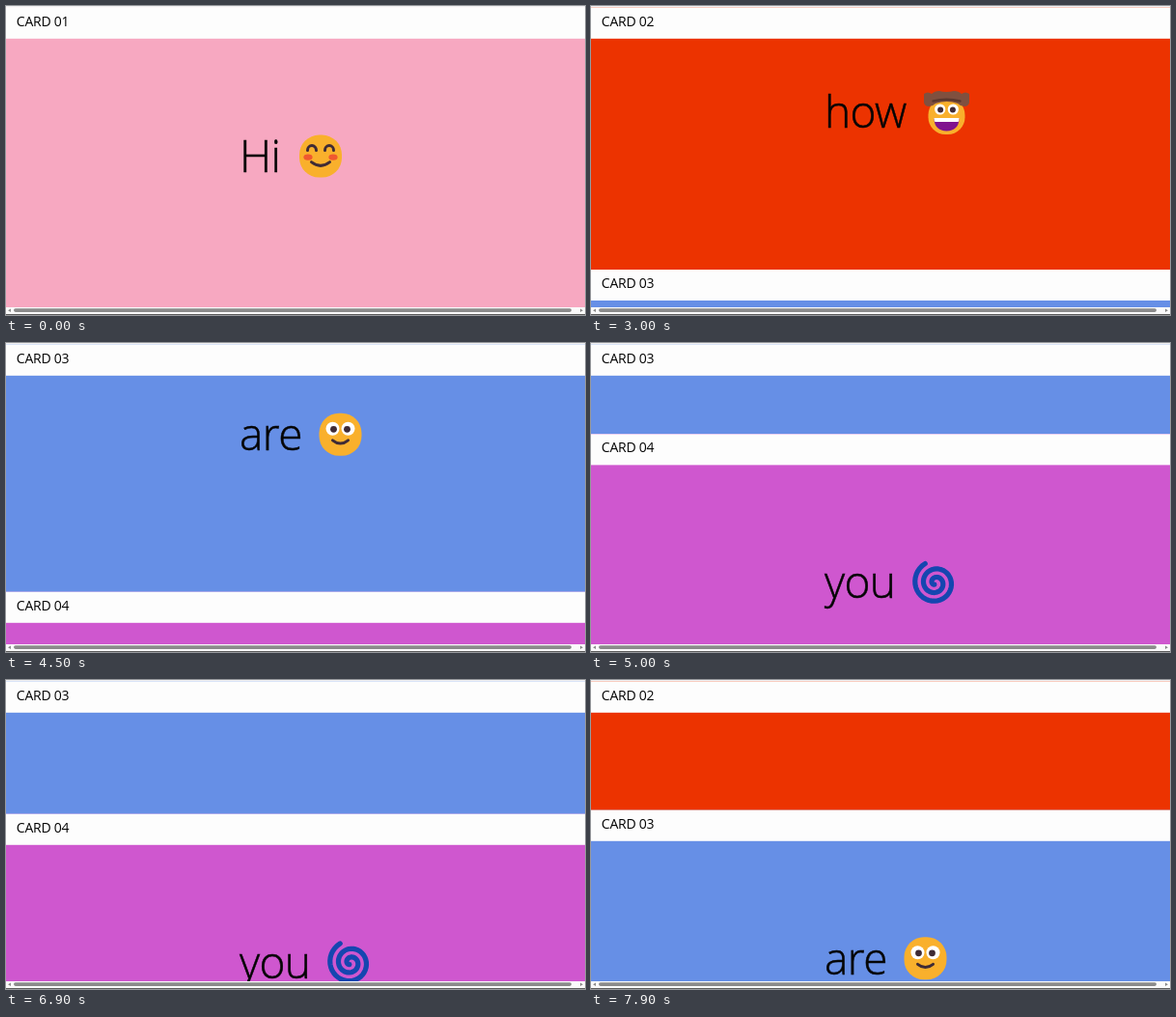
An HTML page for the animation above (8000 ms loop, 600 px wide and 320 px high).

```html
<!DOCTYPE html>
<html lang="en">
<head>
<meta charset="utf-8">
<title>Sticky cards</title>
<style>
  html, body { margin: 0; width: 100%; height: 100%; overflow: hidden; background: #fdfdfd; }
  svg { display: block; width: 600px; height: 320px; }
  text { font-family: "Open Sans", "Noto Sans", sans-serif; fill: #050505; }
  .title { font-size: 14px; font-weight: 500; letter-spacing: -.25px; }
  .word { font-size: 46px; font-weight: 300; letter-spacing: -.6px; stroke: #050505; stroke-width: .5px; }
  .line { fill: none; stroke-linecap: round; stroke-linejoin: round; }
</style>
</head>
<body>
<svg viewBox="0 0 600 320">
  <defs><clipPath id="view"><rect y="1.8" width="600" height="310.2"/></clipPath></defs>
  <rect width="600" height="320" fill="#fdfdfd"/>
  <g id="cards" clip-path="url(#view)"></g>
  <rect width="600" height="1" fill="#f0f0f1"/>
  <g id="scrollbar">
    <rect y="312" width="600" height="8" fill="#fafafa"/>
    <rect x="8" y="313.3" width="578" height="3.6" rx="1.8" fill="#8b8b8b"/>
    <path d="M5 313.4v3.6l-3-1.8zM595 313.4v3.6l3-1.8z" fill="#8b8b8b"/>
    <rect y="319" width="600" height="1" fill="#5c5c5c"/>
  </g>
</svg>
<script>
const LOOP = 8000, STEP = 100;
const CARD_H = 316.5, HEAD_H = 32, TOP = 1.8;

// [time, scroll offset]
const SCROLL = [
  [0, 0], [2100, 0], [2200, 20], [3000, 361.8], [4500, 693.5],
  [5300, 955], [6500, 955], [6900, 812.5], [7900, 500]
];

const INK = '#3f2b35', GOLD = '#f9b02c';
const face = r => `<rect x="${-r}" y="${-r}" width="${2 * r}" height="${2 * r}" rx="${r * 0.93}" fill="${GOLD}"/>`;
const dot = (x, y, r, fill) => `<circle cx="${x}" cy="${y}" r="${r}" fill="${fill}"/>`;
const line = (d, color, width) => `<path class="line" d="${d}" stroke="${color}" stroke-width="${width}"/>`;
const pair = draw => draw(-1) + draw(1);

function blush() {
  return face(22) +
    pair(s => `<ellipse cx="${s * 13}" cy="1" rx="4.6" ry="3.2" fill="#f0592f"/>`) +
    pair(s => line(`M${s * 9 - 4.5} -6.2a4.5 4.8 0 0 1 9 0`, INK, 3)) +
    line('M-9.5 6Q0 13.5 9.5 6', INK, 3);
}

function cowboy() {
  return face(19) +
    pair(s => dot(s * 6.8, -7, 5.6, '#fff') + dot(s * 6.4, -6.5, 3, INK)) +
    '<path d="M-13 2.5h26c0 8-5 13-13 13s-13-5-13-13z" fill="#80138f"/>' +
    '<path d="M-13 2h26q0 3-1 4h-24q-1-1-1-4z" fill="#fff"/>' +
    '<path d="M-23.5 -23q4-3 8 0q3-3 8-3q7 2 15 0q5 0 8 3q4-3 8 0v9q-1 4-5 4q-4 0-7-3q-11-4-23 0q-3 3-7 3q-4 0-5-4z" fill="#80503f"/>' +
    line('M-14 -15.5Q0 -19 14 -15.5', '#5b382e', 2.4);
}

function smile() {
  return face(22) +
    pair(s => dot(s * 8, -6, 7, '#fff') + dot(s * 7, -5.5, 3.4, INK)) +
    line('M-8 6Q0 12.5 8 6', INK, 3);
}

function spiral() {
  const n = 90, turns = 2.35;
  let d = '';
  for (let i = 0; i <= n; i++) {
    const k = i / n, r = 22.5 - 20.5 * k, a = -2.06 - k * turns * 2 * Math.PI;
    d += `${i ? 'L' : 'M'}${(1.5 + r * Math.cos(a)).toFixed(2)} ${(r * Math.sin(a)).toFixed(2)}`;
  }
  return line(d, '#1546b0', 5.2);
}

const CARDS = [
  { word: 'Hi', color: '#f7a8c1', x: 326, y: 153.8, art: blush },
  { word: 'how', color: '#ec3300', x: 368.5, y: 157.5, art: cowboy },
  { word: 'are', color: '#668fe6', x: 346.5, y: 153.5, art: smile },
  { word: 'you', color: '#cf57cf', x: 355.3, y: 154, art: spiral }
];

const root = document.getElementById('cards');
root.innerHTML = CARDS.map((c, i) => `<g>
  <rect width="600" height="${CARD_H}" fill="${c.color}"/>
  <text class="word" x="242" y="169.8">${c.word}</text>
  <g transform="translate(${c.x} ${c.y})">${c.art()}</g>
  <g class="head">
    <rect width="600" height="${HEAD_H}" fill="#fdfdfd"/>
    <text class="title" x="10.8" y="19">CARD 0${i + 1}</text>
  </g>
</g>`).join('');
const cards = [...root.children];
const heads = cards.map(c => c.querySelector('.head'));

function scrollAt(t) {
  const i = SCROLL.findIndex(p => p[0] > t);
  if (i < 0) return SCROLL[SCROLL.length - 1][1];
  const [t0, a] = SCROLL[i - 1], [t1, b] = SCROLL[i];
  return a + (b - a) * (t - t0) / (t1 - t0);
}

const moveY = (el, y) => el.setAttribute('transform', `translate(0 ${y})`);

function draw(t) {
  const s = scrollAt(t);
  cards.forEach((card, i) => {
    const y = TOP + i * CARD_H - s;
    moveY(card, y);
    // headers stick to the top until their card ends
    moveY(heads[i], Math.min(Math.max(TOP - y, 0), CARD_H - HEAD_H));
  });
}

const start = performance.now();
function tick() {
  const t = (performance.now() - start) % LOOP;
  draw(Math.floor(t / STEP) * STEP);
  requestAnimationFrame(tick);
}
tick();
</script>
</body>
</html>
```
